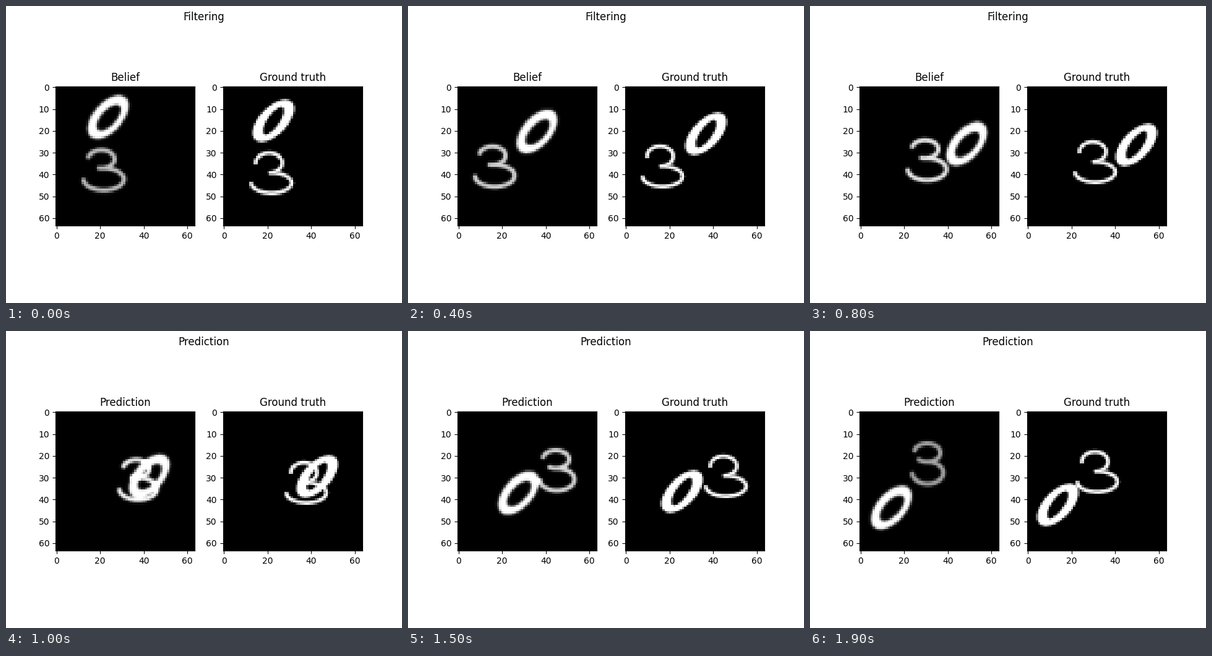
These frames come from a looping animation (640x480 px, 2000 ms). A matplotlib script:

```python
import numpy as np
import matplotlib.pyplot as plt
from matplotlib.animation import FuncAnimation
from matplotlib.path import Path

SIZE, FRAMES, SWITCH, SUB = 64, 20, 10, 4
LOW, HIGH = 4, 40          # range of a digit's left edge


def cell_centres(sub):
    axis = (np.arange(SIZE * sub) + 0.5) / sub
    return np.stack(np.meshgrid(axis, axis), -1).reshape(-1, 2)


FINE, COARSE = cell_centres(SUB), cell_centres(1)


def slanted(centre, half, lean):
    """Coverage of an ellipse in a box; a smaller lean angle makes it slimmer."""
    t = np.linspace(0, 2 * np.pi, 60)
    curve = np.stack([np.cos(t), -np.cos(t + np.radians(lean))], 1)
    inside = Path(curve * half + centre).contains_points(FINE)
    return inside.reshape(SIZE, SUB, SIZE, SUB).mean((1, 3))


def arc(cx, cy, rx, ry, start, end):
    t = np.radians(np.linspace(start, end, 80))
    return np.stack([cx + rx * np.cos(t), cy + ry * np.sin(t)], 1)


def three(corner, mid, shrink, start, end, width):
    """Two bowls that meet at height mid; shrink narrows the lower one."""
    top, bottom = 0.7, 19.1
    upper = arc(9, (top + mid) / 2, 6, (mid - top) / 2, start, end)
    lower = arc(10.1 - 0.9 * shrink, (mid + bottom) / 2,
                9.2 - 2.1 * shrink, (bottom - mid) / 2, -90, 175)
    pts = np.concatenate([upper, lower]) + corner
    gap = np.hypot(*(COARSE[:, None] - pts).transpose(2, 0, 1)).min(1)
    return np.clip(width / 2 + 0.5 - gap, 0, 1).reshape(SIZE, SIZE)


def blur(img, k):
    for ax in (0, 1):
        img = (1 - 2 * k) * img + k * (np.roll(img, 1, ax) + np.roll(img, -1, ax))
    return img


def bounce(x, v):
    """Whole-cell positions that stop at a wall for a frame, then turn back."""
    out = []
    for _ in range(FRAMES):
        out.append(int(x))
        x += v
        if x < LOW or x > HIGH:
            x, v = min(max(x, LOW), HIGH), -v
    return np.array(out)


steps = np.arange(FRAMES)
zero_pos = np.stack([bounce(13.5, 3.4), (6.5 + 1.42 * steps).astype(int)], 1)
three_pos = np.stack([bounce(12.5, -3.5), (30.3 - 0.64 * steps).astype(int)], 1)


def truth(i):
    centre = zero_pos[i] + 10
    ring = slanted(centre, (9.5, 9.7), 55) - slanted(centre, (4.8, 6.2), 42)
    return np.clip(ring + three(three_pos[i], 9.8, 0, 180, 445, 1.7), 0, 1)


def guess(i):
    # The estimate drifts away from the true path
    sway = np.interp(i, [0, 4, 8, 15, 19], [11.1, 9.4, 9.1, 11.9, 10.6])
    lift = np.interp(i, [0, 4, 9, 19], [-1.3, 0.1, -1.1, -3.7])
    glow = np.interp(i, [0, 12, 19], [0.7, 0.93, 0.6])
    centre = zero_pos[i] + (sway, 8.3 + 0.155 * i)
    ring = slanted(centre, (9.3, 10), 58) - slanted(centre + (0.3, 0.3), (5.6, 5.9), 50)
    late = (i / (FRAMES - 1)) ** 2
    digit = three(three_pos[i] + (0, lift), 9, late, 195, 460 + 30 * late, 2)
    return np.clip(1.04 * blur(ring, 0.12) + 1.1 * glow * blur(digit, 0.08), 0, 1)


pairs = [(guess(i), truth(i)) for i in range(FRAMES)]

fig, axes = plt.subplots(1, 2, figsize=(6.4, 4.8), dpi=100)
heading = fig.suptitle("Filtering", y=0.982)
images = [ax.imshow(img, cmap="gray", vmin=0, vmax=1, interpolation="nearest")
          for ax, img in zip(axes, pairs[0])]
label = axes[0].set_title("Belief")
axes[1].set_title("Ground truth")


def update(i):
    early = i < SWITCH
    heading.set_text("Filtering" if early else "Prediction")
    label.set_text("Belief" if early else "Prediction")
    for im, data in zip(images, pairs[i]):
        im.set_data(data)
    return [heading, label, *images]


anim = FuncAnimation(fig, update, frames=FRAMES, interval=100, repeat=True)
plt.show()
```
